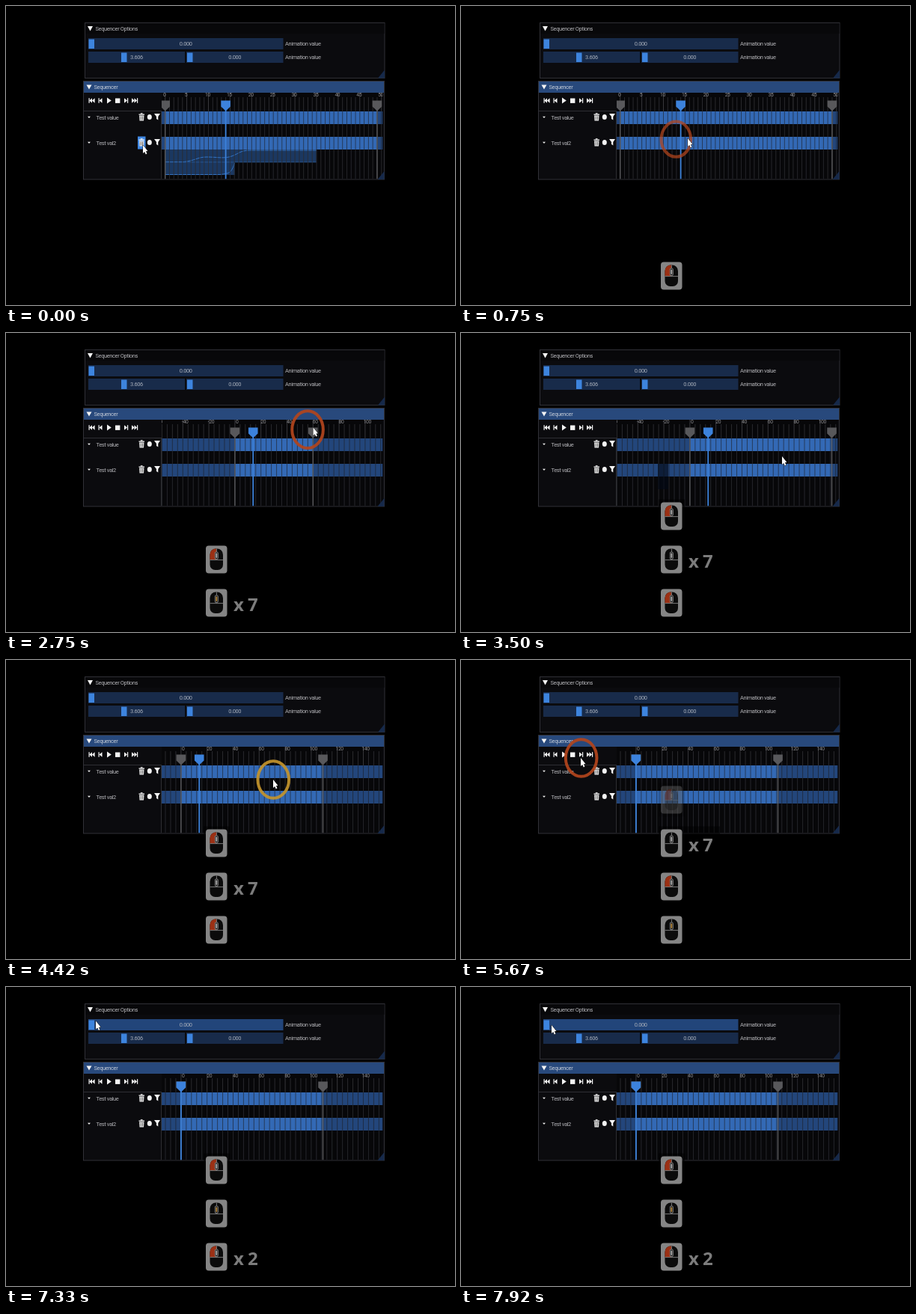
These frames come from a looping animation (600 px wide and 400 px high, 8000 ms). An HTML page with a canvas:

```html
<!DOCTYPE html>
<html lang="en">
<head>
<meta charset="utf-8">
<title>Sequencer</title>
<style>
html, body { margin: 0; width: 100%; height: 100%; overflow: hidden; background: #000; }
canvas { display: block; width: 600px; height: 400px; }
</style>
</head>
<body>
<canvas id="stage"></canvas>
<script>
const LOOP = 8000;
const canvas = document.getElementById('stage');
const ctx = canvas.getContext('2d');
const ratio = window.devicePixelRatio || 1;
canvas.width = 600 * ratio;
canvas.height = 400 * ratio;

const RED = '#b2451d', AMBER = '#c4942c', WHITE = '#f4f4f4', GREY = '#858585';
const LEFT = 208, RIGHT = 503.5, TOP = 116, BOTTOM = 231.5;

// Pointer path: time, x, y
const path = [
  [0, 183, 186], [580, 186, 186], [750, 303, 177], [900, 346, 162], [1800, 346, 162],
  [2200, 391, 134], [2580, 391, 134], [3200, 495.5, 92], [3350, 495.5, 92],
  [3480, 429, 165], [3850, 429, 165], [4400, 357, 160], [4600, 357, 160],
  [5050, 258, 132], [5250, 258, 132], [5650, 160, 131], [5900, 160, 131],
  [6500, 194, 148], [6900, 194, 148], [7400, 116, 40], [7600, 114, 42], [7880, 121, 51]
];
// Button presses: start, end, ring colour
const presses = [
  [350, 710, RED], [2540, 3340, RED], [3860, 4440, AMBER], [5200, 5880, RED], [6660, 6840, RED]
];
const ZOOM = { start: 950, gap: 100, steps: 7, from: 5.78, to: 1.74, anchor: 346 };
const rows = [
  { at: 620, end: 5500, button: 'left' },
  { at: ZOOM.start, end: 6780, button: 'middle', count: t => zoomStep(t) },
  { at: 3330, end: 9999, button: 'left' },
  { at: 4600, end: 9999, button: 'middle' },
  { at: 5950, end: 9999, button: 'left', count: t => t < 6900 ? 1 : 2 }
];

const clamp = (v, a = 0, b = 1) => Math.min(b, Math.max(a, v));
const smooth = u => u * u * (3 - 2 * u);
const ramp = (t, start, length) => smooth(clamp((t - start) / length));
const zoomStep = t => clamp(Math.floor((t - ZOOM.start) / ZOOM.gap) + 1, 0, ZOOM.steps);

function pointer(t) {
  const i = path.findIndex(p => p[0] > t);
  if (i < 1) return path[i < 0 ? path.length - 1 : 0].slice(1);
  const [a, b] = [path[i - 1], path[i]];
  const u = ramp(t, a[0], b[0] - a[0]);
  return [a[1] + (b[1] - a[1]) * u, a[2] + (b[2] - a[2]) * u];
}

function timeline(t) {
  const scale = ZOOM.from * Math.pow(ZOOM.to / ZOOM.from, zoomStep(t) / ZOOM.steps);
  let origin = ZOOM.anchor - (ZOOM.anchor - 212.7) * scale / ZOOM.from;
  const [px] = pointer(t);
  const frameAt = () => Math.round((px - origin) / scale);
  const end = t < 2540 ? 49 : t < 3345 ? clamp(frameAt(), 49, 109) : 109;
  if (t > 3860) origin += pointer(Math.min(t, 4420))[0] - 429;
  const head = t < 5200 ? 14 : t < 5700 ? clamp(frameAt(), 0, 14) : 0;
  return { scale, end, head, x: frame => origin + frame * scale };
}

function box(x, y, w, h, color) {
  ctx.fillStyle = color;
  ctx.fillRect(x, y, w, h);
}
function poly(color, ...pts) {
  ctx.fillStyle = color;
  ctx.beginPath();
  for (let i = 0; i < pts.length; i += 2) ctx.lineTo(pts[i], pts[i + 1]);
  ctx.closePath();
  ctx.fill();
}
function rounded(x, y, w, h, r, color) {
  ctx.fillStyle = color;
  ctx.beginPath();
  ctx.roundRect(x, y, w, h, r);
  ctx.fill();
}
function oval(x, y, rx, ry) {
  ctx.beginPath();
  ctx.ellipse(x, y, rx, ry, 0, 0, 7);
}
function text(str, x, y, color = '#b4b4b8', align = 'left', size = 7.5) {
  ctx.font = size + 'px Roboto, sans-serif';
  ctx.letterSpacing = '-0.4px';
  ctx.textAlign = align;
  ctx.textBaseline = 'middle';
  ctx.fillStyle = color;
  ctx.fillText(str, x, y + 0.5);
}
function panel(x, y, w, h) {
  box(x, y, w, h, '#0b0b0e');
  ctx.strokeStyle = '#303036';
  ctx.lineWidth = 1;
  ctx.strokeRect(x, y, w, h);
}
function grip(x, y) {
  poly('#16294a', x, y - 11, x, y, x - 9, y);
}

function slider(x, y, w, grab, value, [px, py]) {
  const hot = px >= x && px <= x + w && py >= y && py <= y + 15;
  box(x, y, w, 15, hot ? '#22457a' : '#182b4a');
  box(grab, y + 1.5, 7.5, 12.5, '#3d84de');
  text(value, x + w / 2, y + 7.5, '#a9b0bb', 'center');
}

function options(mouse) {
  panel(105.5, 22.5, 400.5, 74);
  box(106, 23, 399.5, 14, '#08080a');
  poly(WHITE, 109, 27, 116, 27, 112.5, 33.5);
  text('Sequencer Options', 119.5, 30);
  slider(110, 43, 260.5, 110.5, '0.000', mouse);
  slider(110, 61, 129, 154, '3.606', mouse);
  slider(241, 61, 129.5, 242, '0.000', mouse);
  text('Animation value', 373, 50.5);
  text('Animation value', 373, 68.5);
  grip(506, 96.5);
}

function transport() {
  const y = 126.5, tri = (x, d) => poly(WHITE, x, y - 3.3, x, y + 3.3, x + d, y);
  const bar = x => box(x, y - 3.3, 1.2, 6.6, WHITE);
  bar(110.5); tri(115, -3.7); tri(118.6, -3.7);
  bar(123.5); tri(128.5, -4);
  poly(WHITE, 135, 122.5, 135, 130.5, 140.8, y);
  box(146, 123.5, 6.4, 6.4, WHITE);
  tri(158, 4); bar(162);
  tri(168, 3.7); tri(171.4, 3.7); bar(175);
}

function track(name, y, [px, py]) {
  for (const x of [176, 187]) {
    if (px >= x && px < x + 11 && py > y - 8 && py < y + 9) box(x, y - 8, 10.5, 17, '#3f87e2');
  }
  poly(WHITE, 109, y - 0.8, 113, y - 0.8, 111, y + 1.6);
  text(name, 120.5, y + 0.5);
  box(177.5, y - 4, 7.5, 1.3, WHITE);
  box(179.8, y - 5.3, 2.8, 1.3, WHITE);
  poly(WHITE, 178, y - 2, 184.5, y - 2, 184, y + 5, 178.5, y + 5);
  for (const x of [179.4, 181, 182.6]) box(x, y - 1, 0.6, 5, '#333');
  ctx.fillStyle = WHITE;
  oval(191.8, y, 3, 3.6);
  ctx.fill();
  poly(WHITE, 198, y - 4.5, 206, y - 4.5, 203.3, y - 0.5, 203.3, y + 4, 201, y + 2.5, 201, y - 0.5);
}

function curves(view) {
  const x = view.x(0);
  box(x, 192, 202, 17, '#1b3861');
  box(x, 209, 93, 17, '#1b3861');
  ctx.strokeStyle = '#3474c4';
  ctx.lineWidth = 1;
  ctx.beginPath();
  ctx.moveTo(x, 208.5);
  ctx.lineTo(238, 208.5);
  ctx.bezierCurveTo(252, 207, 256, 202, 268, 202);
  ctx.bezierCurveTo(282, 202, 288, 204, 298, 202);
  ctx.bezierCurveTo(310, 199, 312, 193, 326, 193);
  ctx.lineTo(415, 193);
  ctx.moveTo(x, 225.5);
  ctx.lineTo(286, 225.5);
  ctx.bezierCurveTo(298, 224, 301, 224, 305.5, 210);
  ctx.stroke();
  box(x, 208.5, 202, 0.8, '#2b5a98');
}

function marker(x, color, width) {
  box(x - width / 2, 138, width, BOTTOM - 138, color);
  poly(color, x - 6.3, 126.5, x + 6.3, 126.5, x + 6.3, 134.5, x, 140.5, x - 6.3, 134.5);
}

function ruler(t, view) {
  const major = [5, 10, 20].find(n => n * view.scale >= 28) || 20;
  const minor = major / 5;
  const start = view.x(0), stop = view.x(view.end);
  ctx.save();
  ctx.beginPath();
  ctx.rect(LEFT, TOP, RIGHT - LEFT, BOTTOM - TOP);
  ctx.clip();
  box(LEFT, TOP, RIGHT - LEFT, BOTTOM - TOP, '#070709');
  for (const y of [141, 175]) {
    box(LEFT, y, RIGHT - LEFT, 17, '#23467b');
    box(start, y, stop - start, 17, '#3369b5');
  }
  if (t < 640) curves(view);
  const first = Math.floor((LEFT - start) / view.scale / major) * major;
  for (let f = first; view.x(f) < RIGHT + 4; f += minor) {
    const x = view.x(f), tall = f % major === 0;
    box(x - 0.5, tall ? TOP : 122, 1, 141 - (tall ? TOP : 122), tall ? '#37373b' : '#2a2a2e');
    box(x - 0.5, 141, 1, BOTTOM - 141, 'rgba(30,32,38,.62)');
    box(x - 0.5, 158, 1, 17, 'rgba(60,60,66,.42)');
    box(x - 0.5, 192, 1, BOTTOM - 192, 'rgba(60,60,66,.42)');
    if (tall) text(String(f), x + 4.7 - view.scale, 118.3, '#8c8c90', 'center', 6.8);
  }
  marker(start, '#58585b', 1.4);
  marker(stop, '#58585b', 1.4);
  marker(view.x(view.head), '#3c82dc', 1.8);
  ctx.restore();
}

function sequencer(t, mouse) {
  panel(103.5, 100.5, 402, 131.5);
  box(104, 101, 401, 15, '#28497c');
  poly(WHITE, 107.5, 105.5, 114.5, 105.5, 111, 111.5);
  text('Sequencer', 117.5, 108.5, '#c2cad6');
  transport();
  box(104, 140, 103, 0.8, '#37373c');
  box(207, 140, 0.8, 91, '#37373c');
  track('Test value', 148.5, mouse);
  track('Test val2', 182.5, mouse);
  ruler(t, timeline(t));
  grip(505.5, 232);
}

function mouseIcon(button, y, wheel) {
  rounded(267, y - 18, 28.5, 37, 4, GREY);
  rounded(272.5, y - 14, 17.5, 28.5, [8, 8, 7, 7], '#0b0b0b');
  if (button === 'left') rounded(272.5, y - 14, 8.5, 15, [8, 0, 0, 0], '#9b3014');
  box(272.5, y + 0.7, 17.5, 0.9, GREY);
  box(280.9, y - 14, 0.9, 15, GREY);
  rounded(278.8, y - 10, 5, 10.5, 2.5, GREY);
  rounded(279.6, y - 9.2, 3.4, 8.9, 1.7, '#1c1c1c');
  rounded(280.3, y - 8, 2, 6.5, 1, wheel);
}

function pressLog(t) {
  rows.forEach((row, i) => {
    const alpha = ramp(t, row.at, 120) * (1 - ramp(t, row.end, 280));
    if (!alpha) return;
    const lift = rows.slice(i + 1).reduce((sum, next) => sum + ramp(t, next.at, 140), 0);
    const y = 360.5 - 58 * lift;
    const count = row.count ? row.count(t) : 1;
    ctx.globalAlpha = alpha;
    box(264, y - 22, count > 1 ? 82 : 35, 45, 'rgba(0,0,0,.5)');
    const glowing = row.button === 'middle' && (i !== 1 || t < 3330);
    mouseIcon(row.button, y, glowing ? '#b08338' : '#a8a8a8');
    if (count > 1) {
      ctx.font = 'bold 24px "Open Sans", "Noto Sans", sans-serif';
      ctx.letterSpacing = '-0.6px';
      ctx.textAlign = 'left';
      ctx.textBaseline = 'alphabetic';
      ctx.fillStyle = '#7c7c7c';
      ctx.fillText('x ' + count, 304, y + 11.5);
    }
    ctx.globalAlpha = 1;
  });
}

function rings(t) {
  const [x, y] = pointer(Math.max(0, t - 40));
  for (const [start, end, color] of presses) {
    const alpha = ramp(t, start, 60) * (1 - ramp(t, end, 140));
    if (!alpha) continue;
    const shrink = 1 - 0.12 * ramp(t, end - 20, 140);
    ctx.globalAlpha = alpha * 0.92;
    ctx.strokeStyle = color;
    ctx.lineWidth = 4;
    oval(x, y, 20.8 * shrink, 24.8 * shrink);
    ctx.stroke();
    ctx.globalAlpha = 1;
  }
}

function arrow([x, y]) {
  ctx.beginPath();
  for (const [dx, dy] of [[0, 0], [0, 11], [2.2, 9], [3.8, 12.4], [5.4, 11.6], [3.9, 8.3], [6.4, 8]]) {
    ctx.lineTo(x + dx, y + dy);
  }
  ctx.closePath();
  ctx.lineWidth = 1;
  ctx.strokeStyle = '#111';
  ctx.fillStyle = '#fff';
  ctx.stroke();
  ctx.fill();
}

function draw(t) {
  const mouse = pointer(t);
  ctx.setTransform(ratio, 0, 0, ratio, 0, 0);
  box(0, 0, 600, 400, '#000');
  options(mouse);
  sequencer(t, mouse);
  if (t > 3330 && t < 4000) box(263, 175, 14, 34, 'rgba(4,10,22,.65)');
  pressLog(t);
  rings(t);
  arrow(mouse);
}

const began = performance.now();
function tick() {
  draw((performance.now() - began) % LOOP);
  requestAnimationFrame(tick);
}
tick();
</script>
</body>
</html>
```
